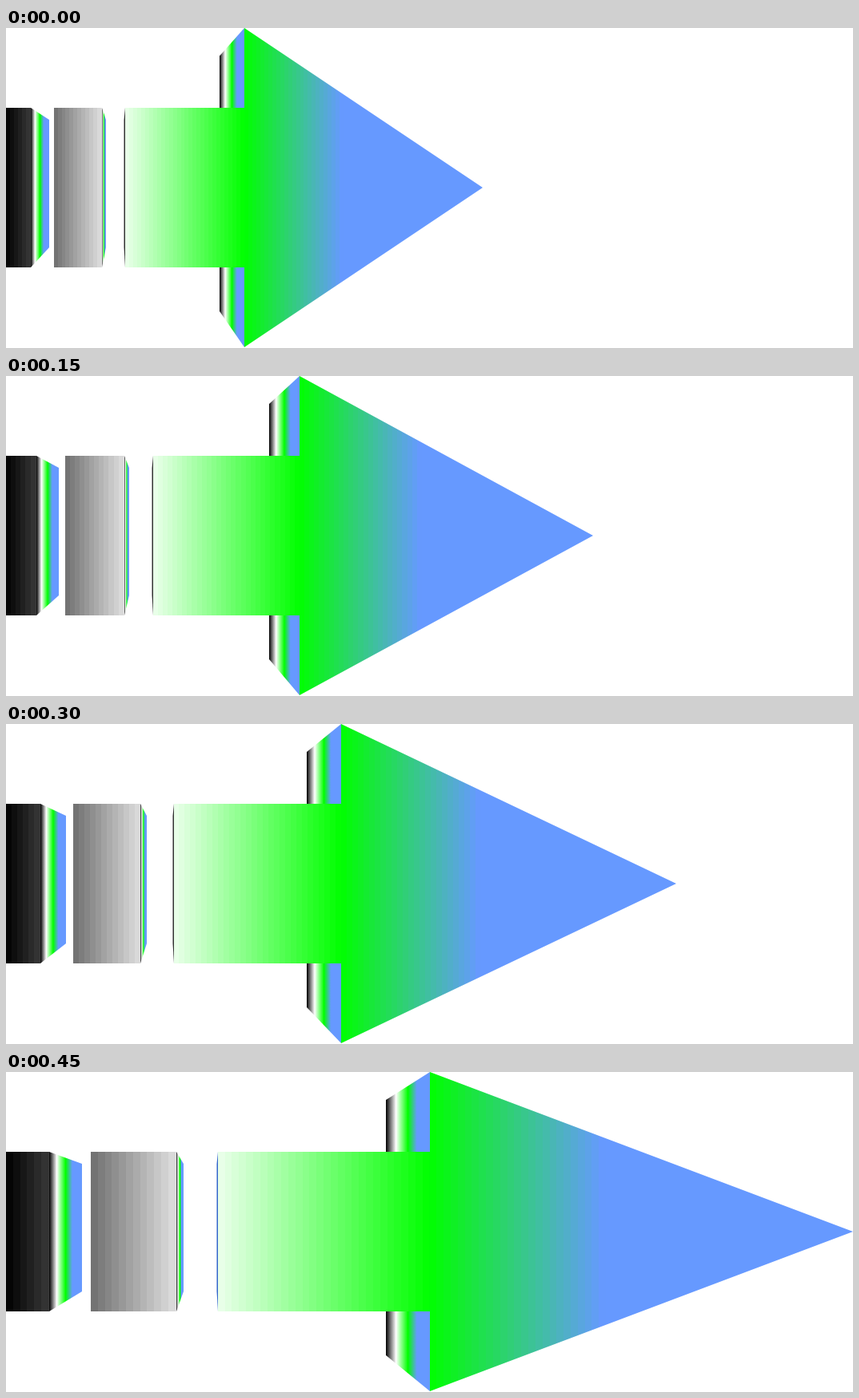
An HTML page with a canvas that plays this animation: 1059x401 px, repeating every 0.6 s.

```html
<!DOCTYPE html>
<html lang="en">
<head>
<meta charset="utf-8">
<title>Stretching arrow</title>
<style>
html, body { margin: 0; width: 100%; height: 100%; overflow: hidden; background: #fff; }
canvas { display: block; }
</style>
</head>
<body>
<canvas id="stage" width="1059" height="401"></canvas>
<script>
const ctx = document.getElementById('stage').getContext('2d');
const LENGTHS = [596, 734, 838, 1059];
const HOLD = 150;
const BANDS = 120;
const STOPS = [
  [0, [0, 0, 0]],
  [0.23, [255, 255, 255]],
  [0.5, [0, 255, 0]],
  [0.705, [102, 153, 255]],
  [1, [102, 153, 255]]
];

function colorAt(t) {
  const i = Math.max(1, STOPS.findIndex(s => s[0] >= t));
  const [a, from] = STOPS[i - 1];
  const [b, to] = STOPS[i];
  const k = (t - a) / (b - a);
  return `rgb(${from.map((c, j) => Math.round(c + (to[j] - c) * k)).join(',')})`;
}

function smooth(x0, x1) {
  const g = ctx.createLinearGradient(x0, 0, x1, 0);
  for (const [t] of STOPS) g.addColorStop(t, colorAt(t));
  return g;
}

function banded(x0, x1) {
  const g = ctx.createLinearGradient(x0, 0, x1, 0);
  for (let i = 0; i < BANDS; i++) {
    const c = colorAt((i + 0.5) / BANDS);
    g.addColorStop(i / BANDS, c);
    g.addColorStop((i + 1) / BANDS, c);
  }
  return g;
}

function poly(fill, ...points) {
  ctx.fillStyle = fill;
  ctx.beginPath();
  for (const [x, y] of points) ctx.lineTo(x, y);
  ctx.fill();
}

// A receding side face of a block
function side(x0, x1) {
  poly(smooth(x0, x1), [x0, 100], [x1, 115], [x1, 275], [x0, 300]);
}

function draw(len) {
  const px = f => Math.round(len * f);
  const face = banded(0, len);
  const blocks = [[0, 0.0512, 0.0898], [0.1003, 0.201, 0.2096]];
  const tail = px(0.25), neck = px(0.5), back = px(0.4486);

  ctx.fillStyle = '#fff';
  ctx.fillRect(0, 0, 1059, 401);

  for (const [a, b, c] of blocks) {
    ctx.fillStyle = face;
    ctx.fillRect(px(a), 100, px(b) - px(a), 200);
    side(px(b), px(c));
  }

  const edge = len > 1000 ? '#36c' : '#333';
  poly(edge, [tail, 100], [tail - 1.5, 115], [tail - 1.5, 275], [tail, 300]);

  const rim = smooth(back, neck);
  poly(rim, [back, 35], [neck, 0], [neck, 100], [back, 100]);
  poly(rim, [back, 300], [neck, 300], [neck, 400], [back, 355]);

  poly(face, [tail, 100], [neck, 100], [neck, 0], [len, 200],
    [neck, 400], [neck, 300], [tail, 300]);
}

function tick() {
  const step = Math.floor(performance.now() / HOLD) % LENGTHS.length;
  draw(LENGTHS[step]);
  requestAnimationFrame(tick);
}
tick();
</script>
</body>
</html>
```
